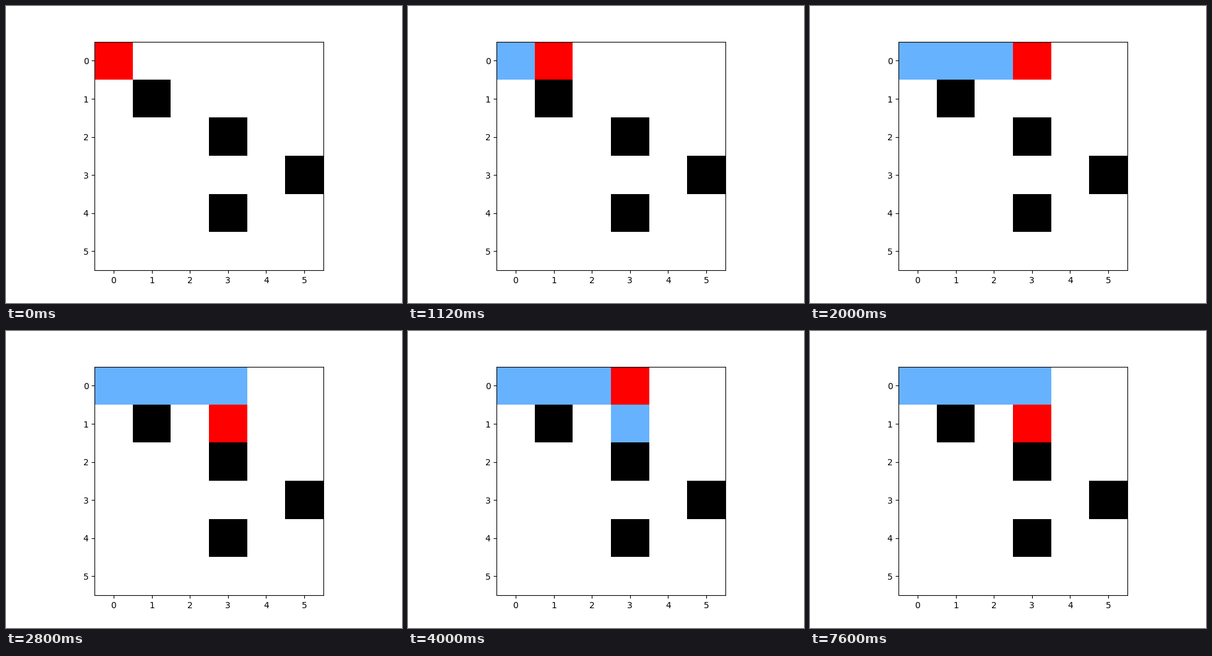
Recreate the animation shown at these times as a matplotlib script. Size 640 by 480 pixels, loop 8000 ms.

```python
import matplotlib.pyplot as plt
import numpy as np
from matplotlib.animation import FuncAnimation

SIZE = 6
STEP_MS = 400

# One letter per step: right, down, up, or "." to wait
MOVES = "R..RR.D..U" + "." * 8 + "D"


def walk(moves):
    """Rows and columns visited, starting in the top left cell."""
    rows = np.cumsum([0] + [(m == "D") - (m == "U") for m in moves])
    cols = np.cumsum([0] + [int(m == "R") for m in moves])
    return rows, cols


rows, cols = walk(MOVES)

# Walls run diagonally to the right edge and bounce back
wall_rows = np.arange(1, SIZE - 1)
wall_cols = SIZE - 1 - 2 * abs(wall_rows - SIZE // 2)


def grid_at(step):
    grid = np.ones((SIZE, SIZE, 3))
    grid[wall_rows, wall_cols] = 0
    grid[rows[:step], cols[:step]] = (0.4, 0.7, 1)
    grid[rows[step], cols[step]] = (1, 0, 0)
    return np.round(grid * 255).astype(np.uint8)


fig, ax = plt.subplots(figsize=(6.4, 4.8), dpi=100)
image = ax.imshow(grid_at(0))


def update(step):
    image.set_data(grid_at(step))
    return [image]


anim = FuncAnimation(fig, update, frames=len(rows), interval=STEP_MS,
                     repeat=True, repeat_delay=0)
plt.show()
```
